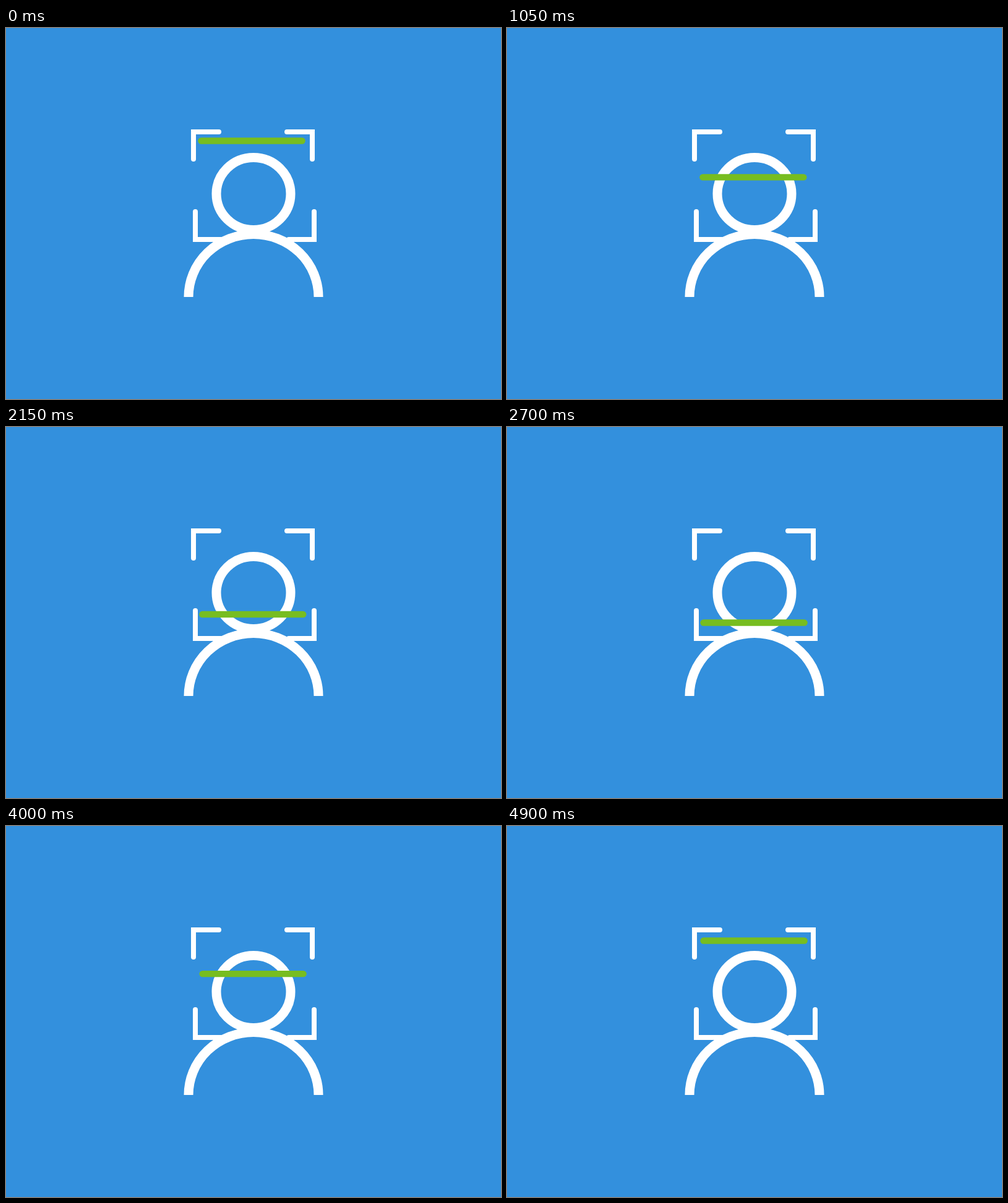
These frames come from a looping animation (800x600 px, 4950 ms). An HTML page:

```html
<!DOCTYPE html>
<html lang="en">
<head>
<meta charset="utf-8">
<title>Face scan</title>
<style>
  html, body { margin: 0; height: 100%; overflow: hidden; background: #3390dd; }
  svg { display: block; width: 100%; height: 100%; }
</style>
</head>
<body>
<svg viewBox="0 0 800 600" fill="none" stroke="#fff">
  <g stroke-width="8" stroke-linecap="round">
    <path d="M303 212V168H344M454 168H495V212"/>
    <path d="M306 297V342H347M457 342H498V297"/>
  </g>
  <g stroke-width="15">
    <ellipse cx="400" cy="268" rx="60" ry="58.5"/>
    <path d="M295 435A105 101.5 0 0 1 505 435"/>
  </g>
  <path id="bar" d="M-81.5 0H81.5" stroke="#77bd20" stroke-width="10.4" stroke-linecap="round"/>
</svg>
<script>
  const LOOP = 4950, TURN = 2550, STEP = 50;
  const TOP = 182.5, BOTTOM = 325.5;
  const bar = document.getElementById('bar');

  function draw(now) {
    const t = Math.floor((now + 1) / STEP) * STEP % LOOP;
    const down = Math.min(t / TURN, 1);
    const up = Math.max((t - TURN) / (LOOP - TURN), 0);
    // The bar drifts slightly right on its way down, then rises straight.
    const x = 397 + 2.1 * down;
    const y = TOP + (BOTTOM - TOP) * (down - up);
    bar.setAttribute('transform', `translate(${x} ${y})`);
  }

  function tick() {
    draw(performance.now());
    requestAnimationFrame(tick);
  }
  tick();
</script>
</body>
</html>
```
